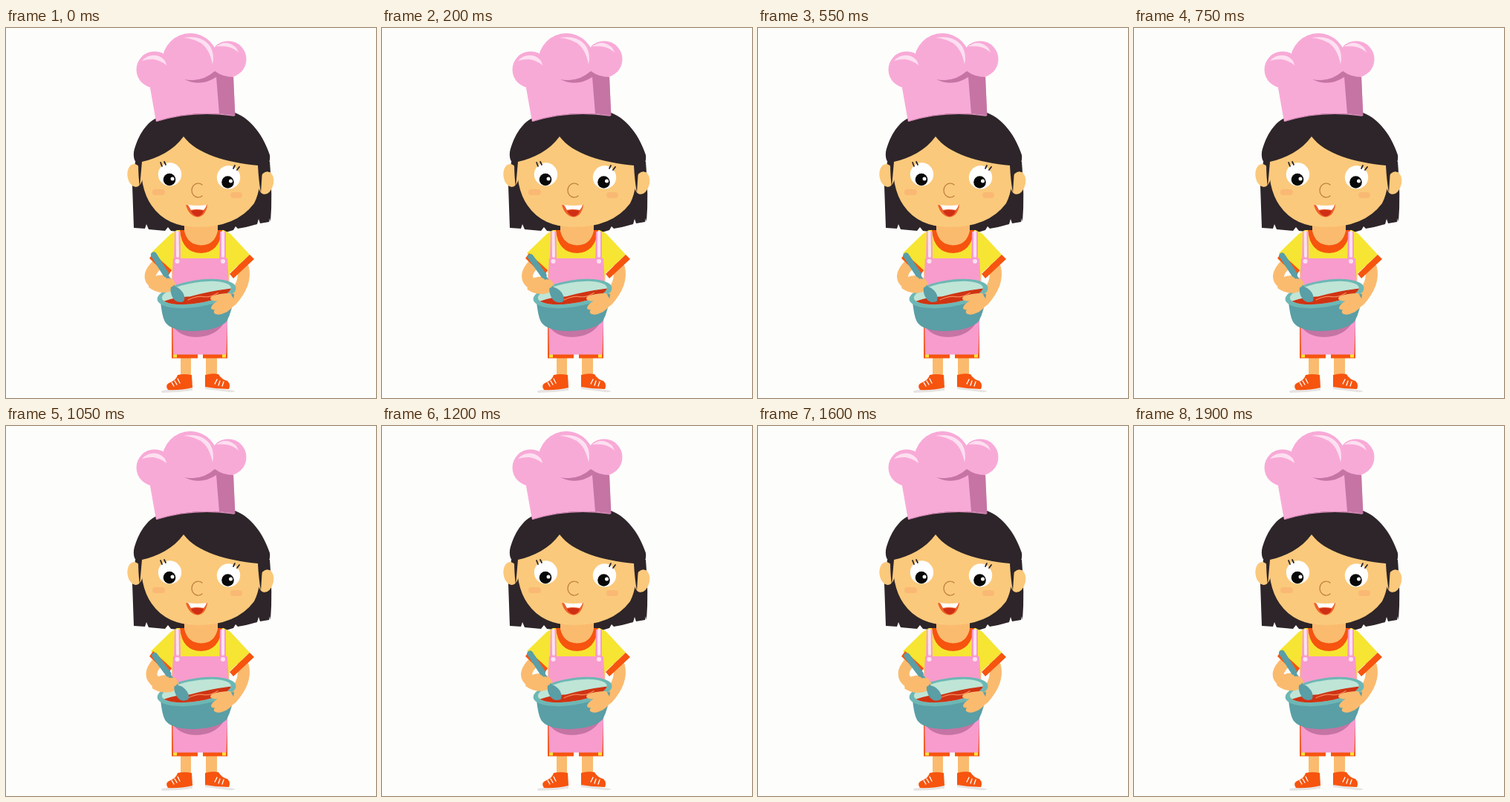
These frames come from a looping animation (498x498 px, 1950 ms). An HTML page:

```html
<!DOCTYPE html>
<html lang="en">
<head>
<meta charset="utf-8">
<title>Stirring cook</title>
<style>
html, body { margin: 0; width: 100%; height: 100%; overflow: hidden; background: #fdfefc; }
svg { display: block; width: 100vw; height: 100vh; }
.face { fill: #fbc97b; }
.skin { fill: #fabb6f; }
.hair { fill: #2d2529; }
.hat { fill: #f8aad7; }
.pink { fill: #f79ccd; }
.plum { fill: #c574a4; }
.shine { fill: #fde0f1; }
.yellow { fill: #f6e532; }
.orange { fill: #f6540f; }
.teal { fill: #5a9ea6; }
.line { fill: none; stroke-linecap: round; stroke-linejoin: round; }
.arm { stroke: #fabb6f; }
</style>
</head>
<body>
<svg viewBox="0 0 498 498">
  <!-- back hair -->
  <path class="hair" d="M174 180L170 212L172 269L187 270L189 264L192 271L214 273L218 268L222 273L240 275H296L306 272L309 267L312 270L323 268L338 264L340 257L342 263L354 261L355 256L356 261Q359 225 355 180Z"/>

  <!-- legs and shoes -->
  <path class="skin" d="M235 442H249V469H235ZM269 442H284V469H269Z"/>
  <path d="M209 488Q230 485 251 484L251 488Q230 491 210 491ZM268 483L308 488Q308 491 300 490L268 486Z" fill="#e6e4e2"/>
  <path class="orange" d="M231 467Q240 465 250 467L251 484Q233 488 218 487Q213 480 221 477Q229 474 231 467ZM268 467Q277 464 286 466Q290 473 298 475Q303 480 300 486Q284 486 268 483Z"/>
  <path class="line" d="M223 477L226 482M227 475L230 480M231 472L234 478M284 473L281 479M288 475L286 481M293 476L291 482" stroke="#fff" stroke-width="1.300"/>

  <!-- shorts -->
  <path class="orange" d="M223 398H298V444.500H265V439H258V444.500H223Z"/>
  <path class="yellow" d="M225 438H230V443.500H225ZM291 438H296V443.500H291Z"/>

  <!-- arms under sleeves -->
  <path class="line arm" id="arm" stroke-width="15"/>
  <path class="line arm" d="M319 323Q324 344 303 367" stroke-width="16"/>

  <!-- shirt -->
  <path class="yellow" d="M230 272L222 277L195 303L223 328L225 390H297L301 330L328 305L302 277L293 272Z"/>
  <path class="orange" d="M198 303L193 310L218 334L223 326ZM328 305L334 311L306 337L301 331Z"/>
  <path class="orange" d="M234 272Q237 303 263 303Q287 302 291 272Z"/>
  <path class="skin" d="M240 262V273Q244 292 263 292.500Q281 292 285 273V262Z"/>

  <!-- apron -->
  <path class="pink" d="M225 310H298L300 345L296.500 439.500H225L223 345Z"/>
  <path class="pink" d="M227 274H234.500L235 313Q231 321 226 314ZM288 274H296V314Q292 321 287 313Z"/>
  <path class="line" d="M230.500 275L231 307M292 275V307" stroke="#fde0f1" stroke-width="4"/>
  <g class="shine"><circle cx="230.500" cy="314" r="3"/><circle cx="292" cy="314" r="3"/></g>
  <path class="plum" d="M225 402Q235 416 257 416Q281 415 292 399Z"/>

  <!-- head -->
  <ellipse class="face" cx="173.500" cy="198.500" rx="10" ry="15.500" transform="rotate(-8 173.500 198.500)"/>
  <ellipse class="face" cx="350" cy="208.500" rx="10" ry="15.500" transform="rotate(12 350 208.500)"/>
  <path class="face" d="M182 170Q179 215 196 239Q216 268 258 268Q310 268 334 236Q345 215 343 170L240 135Z"/>
  <path class="hair" d="M175 181Q171 176 172 167C176 149 187 128 203 121Q252 108 308 114C330 122 347 146 355 171Q356 178 353 183L354 194Q349 191 345 191L343 222Q340 205 339 185C297 181 257 170 239 146C225 165 205 175 183 180L180 214Q178 200 178 181Z"/>

  <!-- face -->
  <g fill="#f9b974"><rect x="197" y="217" width="17" height="8" rx="4"/><rect x="302" y="221" width="16" height="8" rx="4"/></g>
  <g fill="#fff"><circle cx="220.500" cy="197" r="15.700"/><circle cx="299.500" cy="201" r="15.700"/></g>
  <g fill="#080808"><circle cx="220" cy="204" r="8.300"/><circle cx="298.500" cy="207.500" r="8.300"/></g>
  <g fill="#fff"><circle cx="224" cy="203" r="2.500"/><circle cx="302.500" cy="206" r="2.500"/></g>
  <path class="line" d="M208 181L210 186M213 180L215 184M308 185L306 189M314 187L311 191" stroke="#2d2529" stroke-width="1.800"/>
  <path class="line" d="M264 211A8.700 9.500 0 1 0 264 226" stroke="#b97a3e" stroke-width="1.200"/>
  <path d="M242 238Q257 241 271 238Q269 253 258 254.500Q246 253 242 238Z" fill="#f0602a"/>
  <path d="M249 246Q257 244 266 246Q264 253 258 253.500Q252 253 249 246Z" fill="#cf2f14"/>
  <path d="M245 238Q257 240 270 238Q269 242 266 245Q256 243 249 245Z" fill="#fff"/>

  <!-- hat -->
  <g class="hat">
    <circle cx="200" cy="56" r="24.500"/>
    <ellipse cx="248" cy="46" rx="38" ry="39"/>
    <circle cx="299" cy="42" r="24.500"/>
    <path d="M193 75L202 126Q252 109 308 118L306 60L240 45Z"/>
  </g>
  <path class="plum" d="M240 69Q263 74 281 58Q292 66 306 66L308.500 118L287 115L283 66Q262 80 240 69Z"/>
  <path class="line" d="M203 125.500Q252 110 307 118" stroke="#d58ab7" stroke-width="1.300"/>
  <path class="shine" d="M239 13Q264 9 275 25Q281 36 278 49Q274 28 262 20Q251 14 239 13ZM183 44Q193 34 206 38Q215 42 216 50Q207 43 198 42Q190 42 183 44ZM283 25Q292 18 301 21Q310 24 313 33Q305 26 297 25Q290 24 283 25Z"/>

  <!-- bowl -->
  <path class="teal" d="M208 368Q210 390 215 397Q224 408 252 408Q285 407 297 395Q305 380 307 358Z"/>
  <g transform="rotate(-9 256.500 357.500)">
    <ellipse cx="256.500" cy="357.500" rx="53.500" ry="18" fill="#6db7b5"/>
    <ellipse cx="256.500" cy="356.500" rx="47" ry="14" fill="#bfe5d6"/>
    <clipPath id="inside"><ellipse cx="256.500" cy="356.500" rx="47" ry="14"/></clipPath>
    <g clip-path="url(#inside)">
      <path d="M209 361Q230 357 247 360Q274 357 305 358V374H209Z" fill="#cf3413"/>
      <path class="line" d="M244 364Q256 360 265 363T285 361" stroke="#f58a5c" stroke-width="1.200"/>
    </g>
  </g>
  <path class="skin" d="M302 357Q287 357 277 361Q272 365 279 367Q282 368 285 367Q276 373 276 377Q277 380 281 379Q278 383 282 385Q287 387 293 384Q304 380 309 369Z"/>

  <!-- stirring hand and spoon -->
  <g id="stir">
    <path class="skin" d="M193 338Q204 331 215 333Q227 337 228 345Q227 355 215 356Q202 357 192 349Z"/>
    <path class="line" d="M199 305.500L215 331" stroke="#5a9ea6" stroke-width="8"/>
    <path class="line" d="M215 331L228 353" stroke="#5a9ea6" stroke-width="4.500"/>
    <path class="teal" d="M222 348Q231 346 238 356Q242 363 239 368Q230 371 225 364Q220 355 222 348Z"/>
    <path class="skin" d="M211 339Q220 334 225 340Q228 345 224 348Q217 351 211 347Z"/>
  </g>
</svg>
<script>
const LOOP = 1950, STEP = 50, STIR = 650;
const arm = document.getElementById('arm');
const stir = document.getElementById('stir');

function draw(now) {
  const t = Math.floor(now % LOOP / STEP) * STEP;
  const k = (1 - Math.cos(2 * Math.PI * t / STIR)) / 2;
  const dx = 5 * k, dy = 2.8 * k;
  stir.setAttribute('transform', `translate(${dx} ${dy}) rotate(${-5 * k} 212 345)`);
  arm.setAttribute('d', `M204 318Q${187 + dx / 4} ${334 + dy / 2} ${199 + dx} ${343 + dy}`);
  requestAnimationFrame(draw);
}
draw(0);
</script>
</body>
</html>
```
